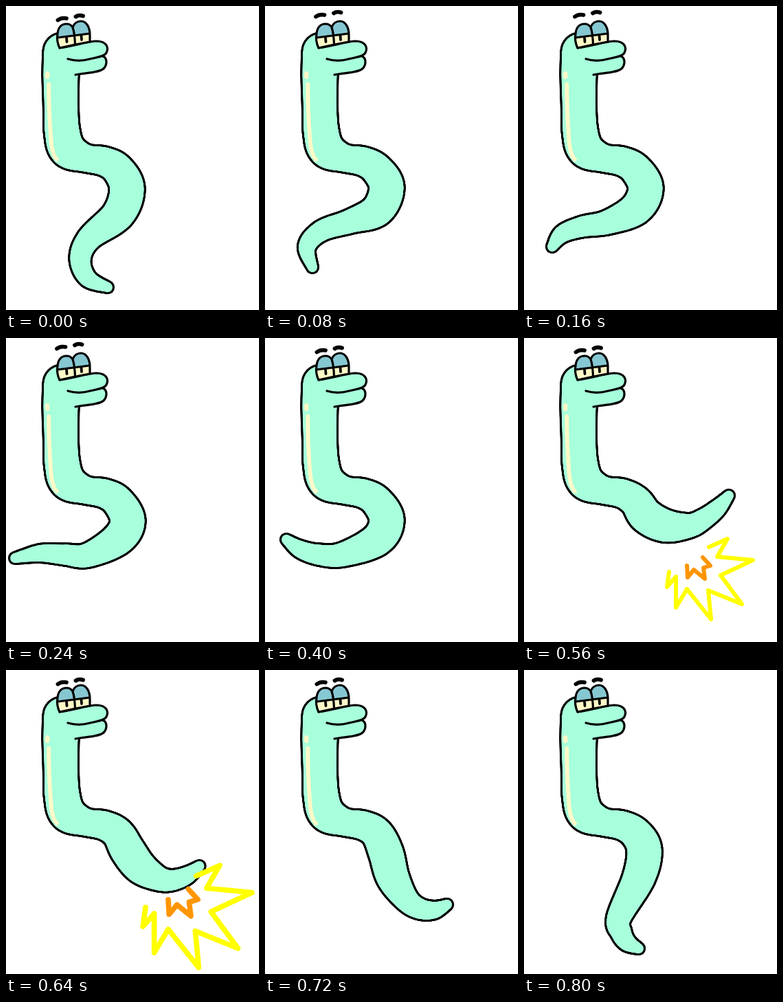
Write an HTML page with a canvas that moves like this. It is 368 px wide and 442 px high and loops after 880 ms.

```html
<!DOCTYPE html>
<html lang="en">
<head>
<meta charset="utf-8">
<title>Tail whip</title>
<style>
  html, body { margin: 0; width: 100%; height: 100%; overflow: hidden; background: #fff; }
  canvas { display: block; width: 100vw; height: 100vh; }
</style>
</head>
<body>
<canvas></canvas>
<script>
const W = 368, H = 442, STEP = 80, LINE = 3.2;
const SKIN = '#a8ffdc', LID = '#86c8d2', CREAM = '#fff9c8';

const canvas = document.querySelector('canvas');
const ctx = canvas.getContext('2d');
const ratio = window.devicePixelRatio || 1;
canvas.width = W * ratio;
canvas.height = H * ratio;

// The body is a spine of [x, y, radius]; only the tail part changes pose.
const neck = [
  [81, 66, 27], [79.5, 100, 26.5], [80, 150, 25.5], [82, 185, 26.5],
  [90, 209, 27], [115, 221, 21], [143, 226, 22], [163, 238, 24]
];
const tailRadii = [26, 24.5, 18.5, 16, 13.5, 8.5];

const hang = [[176, 266], [163, 303], [121, 338], [108, 368], [119, 396], [148, 409]];
const swing = [[177, 264], [163, 297], [124, 313], [82, 327], [61, 350], [69, 380]];
const reach = [[177, 266], [162, 293], [118, 316], [86, 315], [50, 313], [13, 320]];
const curl = [[177, 265], [162, 294], [112, 315], [78, 315], [51, 307], [31, 293]];
const whip = [[177, 266], [178, 304], [162, 345], [148, 364], [132, 380], [116, 388]];
const strike = [[178, 259], [206, 273], [240, 273], [260, 264], [281, 248], [298, 229]];
const fall = [[176, 266], [186, 302], [206, 334], [225, 347], [246, 349], [265, 341]];
const settle = [[175, 262], [167, 302], [138, 360], [141, 381], [150, 396], [167, 405]];

const mid = (a, b) => a.map((p, i) => p.map((v, k) => (v + b[i][k]) / 2));

const steps = [
  { tail: hang },
  { tail: swing, raised: true },
  { tail: mid(swing, reach), raised: true },
  { tail: reach, raised: true },
  { tail: mid(reach, curl), raised: true },
  { tail: curl },
  { tail: whip },
  { tail: strike, burst: 1 },
  { tail: mid(strike, fall), burst: 1.27 },
  { tail: fall },
  { tail: settle }
];

// Catmull-Rom samples through the spine, radius included.
function sample(points, count = 20) {
  const at = i => points[Math.max(0, Math.min(points.length - 1, i))];
  const out = [];
  for (let i = 0; i < points.length - 1; i++) {
    const [a, b, c, d] = [-1, 0, 1, 2].map(k => at(i + k));
    for (let j = 0; j <= count; j++) {
      const t = j / count;
      out.push(b.map((v, k) => v + t / 2 * (c[k] - a[k]
        + t * (2 * a[k] - 5 * v + 4 * c[k] - d[k] + t * (3 * (v - c[k]) + d[k] - a[k])))));
    }
  }
  return out;
}

for (const s of steps) {
  s.discs = sample([...neck, ...s.tail.map((p, i) => [...p, tailRadii[i]])]);
}

function discs(list, grow, color) {
  ctx.fillStyle = color;
  for (const [x, y, r] of list) {
    ctx.beginPath();
    ctx.arc(x, y, r + grow, 0, 2 * Math.PI);
    ctx.fill();
  }
}

function fill(d, color) {
  ctx.fillStyle = color;
  ctx.fill(new Path2D(d));
}

function line(d, color = '#000', width = LINE) {
  ctx.strokeStyle = color;
  ctx.lineWidth = width;
  ctx.stroke(new Path2D(d));
}

function drawFace() {
  const upper = 'M78 61C100 58 115 52 131 51C146 51 150 60 146 68';
  const lower = '141 73C148 76 147 86 142 91C135 97 118 97 101 100';
  fill(`${upper}Q144 72 ${lower}L85 90Z`, SKIN);
  line(`${upper}C143 74 130 75 122 77C112 80 100 80 90 77`);
  line('M' + lower);
  line('M60.2 98V103', CREAM, 6.2);
  line('M62.3 114C62 145 64 175 65.5 195Q67 216 74 223', CREAM, 5.8);

  const eyes = 'M78 61C75 55 74 46 75 40C76 31 81 26 88 26Q94 26 97 31C99 25 104 22 109 22C117 22 122 31 122 42V52Q100 56 78 61Z';
  fill(eyes, LID);
  fill('M75 46L122 40V52Q100 56 78 61Z', CREAM);
  line('M88 46L88.5 52M109.5 43L110 49', '#000', 3.8);
  line(eyes + 'M97 31Q100 40 100.5 56M75 46L122 40');
}

function drawBrows(raised) {
  ctx.save();
  if (raised) ctx.translate(-1.5, -5);
  line('M75.5 20.5Q81 16.5 88 18M101.5 15.5Q106 12.5 112 14.5', '#000', 5.8);
  ctx.restore();
}

function drawBurst(scale) {
  ctx.save();
  ctx.translate(241, 321);
  ctx.scale(scale, scale);
  ctx.translate(-241, -321);
  line('M211 340L208 362L221 347V392L237 365L272 409L268 367L317 387L286 345L333 323L281 318L296 292L269 304', '#ff0', 6);
  line('M237 331L238 348L247 337L263 350L261 334L271 331L260 319', '#ff9500', 6);
  ctx.restore();
}

function draw(time) {
  const s = steps[Math.floor(time / STEP) % steps.length];
  ctx.setTransform(ratio, 0, 0, ratio, 0, 0);
  ctx.clearRect(0, 0, W, H);
  ctx.lineCap = ctx.lineJoin = 'round';
  discs(s.discs, LINE / 2, '#000');
  discs(s.discs, -LINE / 2, SKIN);
  drawFace();
  drawBrows(s.raised);
  if (s.burst) drawBurst(s.burst);
}

const start = performance.now();
function tick() {
  draw(performance.now() - start);
  requestAnimationFrame(tick);
}
tick();
</script>
</body>
</html>
```
